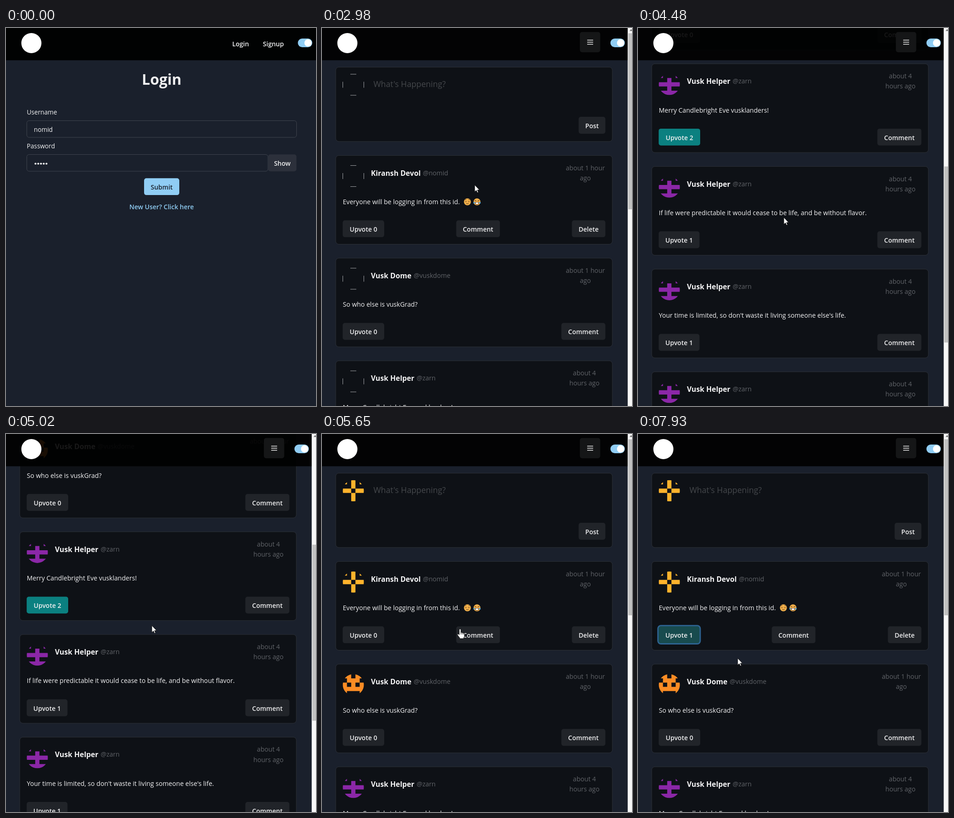
An HTML page that plays this animation: 678 px wide and 826 px high, repeating every 8000 ms.

```html
<!DOCTYPE html>
<html lang="en">
<head>
<meta charset="utf-8">
<title>Login and feed</title>
<style>
  html, body { margin: 0; width: 100%; height: 100%; overflow: hidden; background: #1a202c; }
  svg { display: block; width: 678px; height: 826px; }
  text { font-family: "Open Sans", "Noto Sans", sans-serif; font-size: 14.1px; fill: #f4f4f5; white-space: pre; }
  .label { font-size: 13.7px; }
  .bold { font-size: 14px; font-weight: 600; }
  .name { font-size: 15.8px; font-weight: 700; }
  .title { font-size: 32px; font-weight: 700; fill: #eeeeef; }
  .dim { fill: #606368; font-weight: 400; font-size: 14.1px; }
  .hint { font-size: 17.7px; fill: #44474b; }
  .mid { text-anchor: middle; }
  .link { fill: #90cdf4; }
  .box { fill: none; stroke: #3f444e; }
  .card { fill: #0e1116; stroke: #2c3037; }
</style>
</head>
<body>
<svg id="stage" viewBox="0 0 678 826" xmlns="http://www.w3.org/2000/svg"></svg>
<script>
const LOOP = 8000, FEED_AT = 2980, AVATARS_AT = 3040, STEP = 70;
const POST_TOP = 278.5, POST_GAP = 224.35;
const GREY = [33, 36, 41], GREY_HOVER = [52, 55, 60], GREY_PRESS = [70, 73, 78], TEAL = [11, 128, 128];
const SKY = [144, 205, 244], SKY_HOVER = [99, 179, 237], SKY_PRESS = [66, 153, 225];

const rgb = c => `rgb(${c.map(Math.round)})`;
const mix = (a, b, k) => a.map((v, i) => v + (b[i] - v) * k);
const ramp = (t, from, to) => Math.max(0, Math.min(1, (t - from) / (to - from)));

// ---------- drawing helpers ----------
const rect = (x, y, w, h, r, attrs) => `<rect x="${x}" y="${y}" width="${w}" height="${h}" rx="${r}" ${attrs}/>`;
const text = (x, y, s, cls = '', attrs = '') => `<text x="${x}" y="${y}" class="${cls}" ${attrs}>${s}</text>`;
const group = (id, s) => `<g id="${id}">${s}</g>`;

function button(x, y, w, label, { fill = rgb(GREY), id = '', ink = '#f0f0f1' } = {}) {
  return `<g id="${id}">` + rect(x, y, w, 36.9, 5, `fill="${fill}"`) +
    text(x + w / 2, y + 24.8, label, 'bold mid', `style="fill:${ink}"`) + '</g>';
}

function ring(id, x, y, w) {
  return rect(x - 1.5, y - 1.5, w + 3, 39.9, 6.5,
    `id="${id}" fill="none" stroke="#4299e1" stroke-width="3" opacity="0"`);
}

const toggle = x => rect(x, 23, 31.5, 19, 9.5, 'fill="#90cdf4"') +
  `<circle cx="${x + 22.3}" cy="32.5" r="8" fill="#fff"/>`;

const ICONS = {
  amber: ['#ffb32c', 'X.X.X ..X.. XX.XX ..X.. ..X..'],
  orange: ['#fb8c24', 'XX.XX .XXX. X.X.X XXXXX X...X'],
  purple: ['#8b27a7', 'X...X ..X.. XXXXX ..X.. XXXXX']
};

function avatar(cy, kind) {
  const [color, rows] = ICONS[kind], cell = 9.28, r = cell * 2.5;
  let d = '';
  rows.split(' ').forEach((row, j) => [...row].forEach((c, i) => {
    if (c === 'X') d += `M${i * cell - r} ${j * cell - r}h${cell}v${cell}h${-cell}z`;
  }));
  return `<g transform="translate(68.5 ${cy})">` +
    `<path class="loaded" clip-path="url(#disc)" d="${d}" fill="${color}"/>` +
    '<path class="empty" d="M-6.5-23h13M-6.5 23h13M-23-6.5v13M23-6.5v13" stroke="#a2a4a7"/></g>';
}

const face = (x, y, parts) => `<g transform="translate(${x} ${y})">` +
  `<circle r="7.6" fill="#f2b04a"/><g fill="none" stroke="#6b4322" stroke-width="1.1">${parts}</g></g>`;

const emojis = y =>
  face(318, y, '<path d="M-5-1q1.700 1.800 3.400 0M1.600-1q1.700 1.800 3.400 0M-2.500 3.500q2.500 1.500 5 0M-5-4l2.500-1M5-4l-2.500-1"/>') +
  face(339, y, '<path d="M-5-2q1.700-1.800 3.400 0M1.600-2q1.700-1.800 3.400 0"/><path d="M-4 1h8q-1 5-4 5t-4-5z" fill="#fff"/>' +
    '<path d="M-5.500 0.500l-1.500 3M5.500 0.500l1.500 3" stroke="#4fa9e0" stroke-width="3"/>');

// ---------- content ----------
const HELPER = ['Vusk Helper', '@zarn', 'purple', ['about 4', 'hours ago'], 574];
const POSTS = [
  ['Kiransh Devol', '@nomid', 'amber', ['about 1 hour', 'ago'], 576, 'Everyone will be logging in from this id.', 0],
  ['Vusk Dome', '@vuskdome', 'orange', ['about 1 hour', 'ago'], 576, 'So who else is vuskGrad?', 0],
  [...HELPER, 'Merry Candlebright Eve vusklanders!', 2],
  [...HELPER, 'If life were predictable it would cease to be life, and be without flavor.', 1],
  [...HELPER, "Your time is limited, so don't waste it living someone else's life.", 1],
  [...HELPER, 'Keep going, one small step at a time.', 1]
];

function post([name, handle, icon, when, whenX, body, votes], i) {
  const y = POST_TOP + i * POST_GAP, by = y + 141.7, own = i === 0;
  let s = rect(30, y, 605, 194, 7, 'class="card"') + avatar(y + 45, icon) +
    `<text x="107" y="${y + 44}" class="name">${name}<tspan class="dim" dx="5" dy="-1">${handle}</tspan></text>` +
    when.map((line, k) => text(whenX, y + 32 + k * 22.2, line, 'dim mid')).join('') +
    text(45.5, y + 106.3, body);
  s += button(45.2, by, votes === 1 ? 89.3 : 90.8, 'Upvote ' + votes,
    { id: own ? 'upvote' : '', fill: rgb(votes === 2 ? TEAL : GREY) });
  if (own) {
    s += emojis(y + 101.3) + ring('voteRing', 45.2, by, 90.8) +
      button(293.5, by, 95.6, 'Comment', { id: 'comment' }) + button(546.5, by, 73.3, 'Delete');
  } else {
    s += button(523.5, by, 96.3, 'Comment');
  }
  return s;
}

const loginPage = () =>
  rect(0, 0, 678, 70.500, 0, 'fill="#010202"') +
  text(513, 40, 'Login', 'bold mid') + text(584.8, 40, 'Signup', 'bold mid') + toggle(638.3) +
  text(340.5, 124, 'Login', 'title mid') +
  text(45.5, 189, 'Username', 'label') + rect(45.5, 202.500, 590, 36.5, 5, 'class="box"') +
  text(61, 227, 'nomid', 'label') +
  text(45.5, 263, 'Password', 'label') + rect(45.5, 276.500, 527.5, 36.5, 5, 'class="box"') +
  [0, 1, 2, 3, 4].map(i => `<circle cx="${64.5 + i * 6}" cy="296.5" r="2.1" fill="#f4f4f5"/>`).join('') +
  button(573.3, 276.3, 62, 'Show', { fill: '#2c303b' }) +
  ring('submitRing', 302, 328.2, 77) +
  button(302, 328.2, 77, 'Submit', { id: 'submit', fill: rgb(SKY), ink: '#1a202c' }) +
  text(340.3, 396, 'New User? Click here', 'bold mid link', 'id="link"');

const feedPage = () =>
  group('list',
    rect(30, 85.5, 605, 162.5, 7, 'class="card"') + avatar(124, 'amber') +
    text(112.5, 129, "What's Happening?", 'hint') + button(561.3, 194, 58.5, 'Post') +
    POSTS.map(post).join('')) +
  rect(0, 0, 669, 70.5, 0, 'fill="#000" fill-opacity=".9"') +
  rect(564, 8.800, 44.500, 44.2, 5, 'fill="#151617"') +
  '<path d="M580 26.500h13M580 31h13M580 35.500h13" stroke="#eee" stroke-width="1.5"/>' + toggle(630.8) +
  rect(668.6, 0, 9.4, 826, 0, 'fill="#f7f7f7"') +
  '<path d="M672.500 6.500l3.500-4 2 2v2z" fill="#777"/>' +
  rect(670, 11.5, 8, 384.7, 0, 'id="thumb" fill="#c1c1c1"');

const ARROW = 'M0 0V15L3.500 11.800 5.800 17 8 16 5.800 11H10.400Z';
const HAND = 'M-1.800.8a1.800 1.800 0 0 1 3.600 0V7q1.700-1 3 .6 1.700-.8 2.700.8 2.200-.4 2.200 1.600V13q0 3-1.800 5.200V20H-.8V18.500L-5 13q-1.500-2 .3-3 1.200-.5 2.900 1.700Z' +
  'M1.800 7v4M4.800 7.600v3.400M7.500 8.400v3';

const stage = document.getElementById('stage');
stage.innerHTML =
  '<defs><clipPath id="disc"><circle r="23.2"/></clipPath></defs>' +
  rect(0, 0, 678, 826, 0, 'fill="#1a202c"') +
  group('login', loginPage()) + group('feed', feedPage()) +
  '<circle cx="55.500" cy="33" r="22" fill="#fff"/>' +
  '<path id="cursor" fill="#fff" stroke="#111" stroke-width=".9" stroke-linejoin="round"/>';

const el = {};
stage.querySelectorAll('[id]').forEach(n => { if (n.id) el[n.id] = n; });
const loaded = stage.querySelectorAll('.loaded'), empty = stage.querySelectorAll('.empty');

// ---------- motion ----------
// Spans in which the picture advances in fixed steps; it holds still between them.
const SPANS = [[330, 610], [810, 1440], [1900, 2320], [2980, 2980], [3040, 3040], [3640, 4480],
  [4680, 5170], [5300, 6000], [6200, 6970], [7040, 7460], [7860, 7930]];

const POINTER = [
  [330, 631, 798], [470, 500, 632], [610, 389, 489], [740, 389, 489],
  [1020, 354, 404], [1160, 345, 386], [1440, 335, 342], [2979, 335, 342],
  [2980, 334, 343], [3570, 334, 343], [4410, 318, 407], [4480, 319, 414], [4610, 319, 414],
  [5300, 319, 423], [5510, 319, 425], [5650, 302, 427], [6000, 161, 450], [6130, 161, 450],
  [6550, 102, 440], [6970, 98, 441], [7460, 218, 490]
];
const SCROLL = [[3570, 0], [3710, 60], [4270, 600], [4410, 649], [4610, 649], [4750, 625],
  [5300, 333], [5510, 85], [5580, 22], [5650, 0]];

function stepped(t) {
  let out = 0;
  for (const [a, b] of SPANS) if (t >= a) out = Math.min(b, a + Math.floor((t - a) / STEP) * STEP);
  return out;
}

function track(keys, t) {
  const n = keys.findIndex(k => k[0] > t);
  if (n === 0) return keys[0].slice(1);
  if (n < 0) return keys[keys.length - 1].slice(1);
  const a = keys[n - 1], b = keys[n];
  return mix(a, b, ramp(t, a[0], b[0])).slice(1);
}

const show = (node, on) => node.setAttribute('display', on ? 'inline' : 'none');
const inside = (x, y, l, t, r, b) => x >= l && x <= r && y >= t && y <= b;

// Rises over [a, b], then falls over [c, d].
const pulse = (t, a, b, c, d) => ramp(t, a, b) - ramp(t, c, d);

function drawLogin(t, x, y) {
  const hover = mix(SKY, SKY_HOVER, ramp(t, 1230, 1440));
  const press = pulse(t, 1830, 1970, 2110, 2320);
  el.submit.firstChild.setAttribute('fill', rgb(mix(hover, SKY_PRESS, press)));
  el.submitRing.setAttribute('opacity', .6 * ramp(t, 1830, 2040));
  const onLink = inside(x, y, 270, 380, 411, 402);
  el.link.setAttribute('text-decoration', onLink ? 'underline' : 'none');
  return onLink || inside(x, y, 302, 328, 379, 365);
}

function drawFeed(t, x, y) {
  const [scroll] = track(SCROLL, t);
  el.list.setAttribute('transform', `translate(0 ${-scroll})`);
  el.thumb.setAttribute('y', 11.5 + scroll * .4485);
  loaded.forEach(n => show(n, t >= AVATARS_AT));
  empty.forEach(n => show(n, t < AVATARS_AT));

  const voted = t >= 7860, width = voted ? 89.3 : 90.8;
  const [box, label] = el.upvote.children;
  let fill = mix(GREY, GREY_HOVER, pulse(t, 6270, 6480, 7040, 7250));
  fill = mix(fill, GREY_PRESS, pulse(t, 6690, 6760, 6830, 6970));
  box.setAttribute('fill', rgb(mix(fill, TEAL, .42 * ramp(t, 7860, 7930))));
  box.setAttribute('width', width);
  label.setAttribute('x', 45.2 + width / 2);
  label.textContent = 'Upvote ' + (voted ? 1 : 0);
  el.voteRing.setAttribute('width', width + 3);
  el.voteRing.setAttribute('opacity', .6 * ramp(t, 6690, 6900));
  el.comment.setAttribute('transform', `translate(${voted ? -1 : 0} 0)`);

  return scroll < 1 && (inside(x, y, 45, 420, 136, 457) || inside(x, y, 293, 420, 389, 457));
}

function draw(time) {
  const t = stepped(time), [x, y] = track(POINTER, t), onFeed = t >= FEED_AT;
  show(el.login, !onFeed);
  show(el.feed, onFeed);
  const hand = onFeed ? drawFeed(t, x, y) : drawLogin(t, x, y);
  show(el.cursor, t >= 330);
  el.cursor.setAttribute('d', hand ? HAND : ARROW);
  el.cursor.setAttribute('transform', `translate(${x} ${y})`);
}

const start = performance.now();
function frame() {
  draw((performance.now() - start) % LOOP);
  requestAnimationFrame(frame);
}
frame();
</script>
</body>
</html>
```
